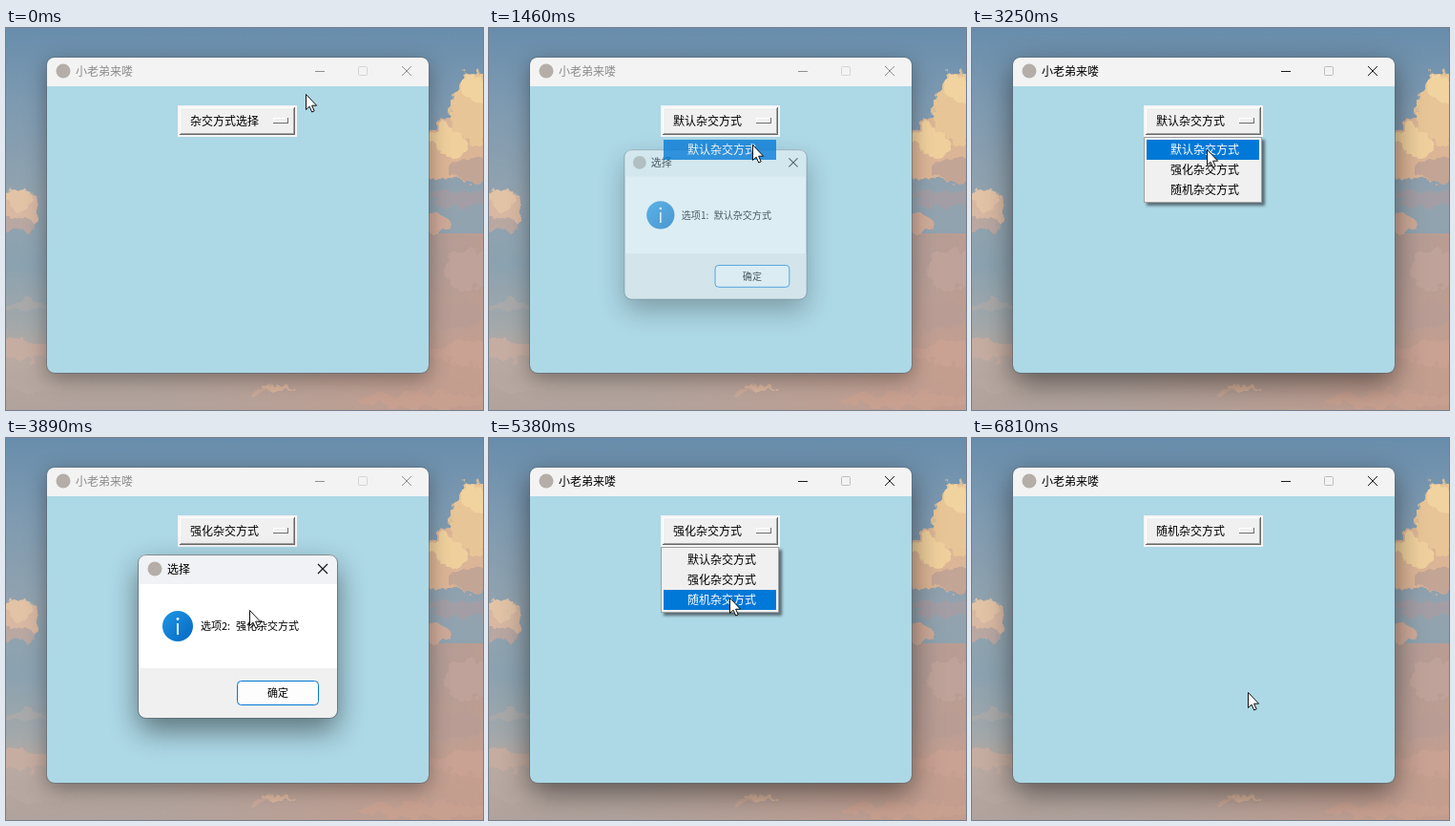
Recreate the animation shown at these times as an HTML page. Size 500 by 400 pixels, loop 6960 ms.

```html
<!DOCTYPE html>
<html lang="zh-CN">
<head>
<meta charset="utf-8">
<title>小老弟来喽</title>
<style>
  html, body { margin: 0; width: 100%; height: 100%; overflow: hidden; }
  svg { display: block; width: 500px; height: 400px; }
  text { font: 12px "Noto Sans CJK SC", "Noto Sans CJK", "Noto Sans", sans-serif; fill: #000; white-space: pre; }
  .small { font-size: 11px; }
  #main .frame { filter: drop-shadow(0 6px 11px rgba(0,0,0,.36)); }
  #main.active .frame { filter: drop-shadow(0 10px 15px rgba(0,0,0,.5)); }
  #main .title { fill: #8c8c8c; }
  #main.active .title { fill: #000; }
  #main .control { stroke: #8f8f8f; }
  #main.active .control { stroke: #1a1a1a; }
  #main .disabled { stroke: #d4d4d4; }
  #main.active .disabled { stroke: #bdbdbd; }
  #dialog .frame { filter: drop-shadow(0 13px 15px rgba(0,0,0,.48)); }
  #ok { fill: #fdfdfd; }
  #ok.hover { fill: #e0eef9; }
  .row rect { fill: none; }
  .row.hot rect { fill: #0078d7; }
  .row.hot text { fill: #fff; }
  #menu .panel { filter: drop-shadow(3px 3px 1.5px rgba(0,0,0,.5)); }
</style>
</head>
<body>
<svg viewBox="0 0 500 400">
  <defs>
    <linearGradient id="sky" x2="0" y2="1">
      <stop offset="0" stop-color="#688dac"/>
      <stop offset=".2" stop-color="#7e9ab1"/>
      <stop offset=".45" stop-color="#93a3ae"/>
      <stop offset=".62" stop-color="#8ba2b0"/>
      <stop offset=".78" stop-color="#a3a8aa"/>
      <stop offset=".86" stop-color="#b9aaa2"/>
      <stop offset="1" stop-color="#b0a29c"/>
    </linearGradient>
    <linearGradient id="warm">
      <stop offset=".3" stop-color="#c99a88" stop-opacity="0"/>
      <stop offset="1" stop-color="#c99a88" stop-opacity=".75"/>
    </linearGradient>
    <linearGradient id="info" x2="1" y2="1">
      <stop offset="0" stop-color="#1e97e4"/>
      <stop offset="1" stop-color="#0667c2"/>
    </linearGradient>
    <filter id="brush" filterUnits="userSpaceOnUse" x="-20" y="-20" width="540" height="440">
      <feTurbulence type="fractalNoise" baseFrequency=".06" numOctaves="3" seed="8"/>
      <feDisplacementMap in="SourceGraphic" scale="22" xChannelSelector="R" yChannelSelector="G"/>
      <feGaussianBlur stdDeviation=".7"/>
    </filter>
    <clipPath id="mainClip"><rect x="43" y="31" width="400" height="330" rx="8"/></clipPath>
    <clipPath id="dialogClip"><rect x="139" y="122" width="208" height="171" rx="8"/></clipPath>
  </defs>

  <rect width="500" height="400" fill="url(#sky)"/>
  <rect y="215" width="500" height="185" fill="url(#warm)"/>
  <g id="clouds" filter="url(#brush)"></g>

  <g id="main">
    <rect class="frame" x="43" y="31" width="400" height="330" rx="8" fill="#add8e6"/>
    <rect x="43" y="31" width="400" height="30" fill="#f3f3f3" clip-path="url(#mainClip)"/>
    <rect x="42.5" y="30.5" width="401" height="331" rx="8" fill="none" stroke="#5b6a75" stroke-opacity=".55"/>
    <circle cx="60" cy="45" r="7.5" fill="#b5aea8"/>
    <text class="title" x="73" y="49.5">小老弟来喽</text>
    <g fill="none">
      <path class="control" d="M324 45.5H334"/>
      <rect class="disabled" x="369.5" y="40.5" width="9" height="9" rx="1"/>
      <path class="control" d="M415 40L425 50M425 40L415 50"/>
    </g>
    <rect x="180" y="81" width="125" height="33" fill="#f4f4f4"/>
    <path d="M182 83H303V112H182Z" fill="#696969"/>
    <path d="M182 83H302V111H182Z" fill="#fff"/>
    <path d="M183 84H302V111H183Z" fill="#a0a0a0"/>
    <path d="M183 84H301V110H183Z" fill="#f0f0f0"/>
    <path d="M280 94H296V100H280Z" fill="#696969"/>
    <path d="M280 94H295V99H280Z" fill="#fff"/>
    <path d="M281 95H294V98H281Z" fill="#f0f0f0"/>
    <text id="choice" x="193" y="102"></text>
  </g>

  <g id="dialog">
    <rect class="frame" x="139" y="122" width="208" height="171" rx="8" fill="#fff"/>
    <g clip-path="url(#dialogClip)">
      <rect x="139" y="122" width="208" height="31" fill="#f0f2f5"/>
      <rect x="139" y="241" width="208" height="52" fill="#f0f0f0"/>
    </g>
    <rect x="138.5" y="122.5" width="209" height="171" rx="8" fill="none" stroke="#56666f" stroke-opacity=".7"/>
    <circle cx="156" cy="137" r="7.5" fill="#b5aea8"/>
    <text x="169" y="141.5">选择</text>
    <path d="M327 132L337 142M337 132L327 142" stroke="#111" stroke-width="1.1"/>
    <circle cx="180" cy="197" r="16" fill="url(#info)"/>
    <path d="M180 194V206" stroke="#fff" stroke-width="1.8"/>
    <circle cx="180" cy="189.5" r="1.4" fill="#fff"/>
    <text id="option" class="small" x="204" y="201.2"></text>
    <text id="message" class="small" x="241" y="201.2"></text>
    <rect id="ok" x="242.5" y="254.5" width="85" height="25" rx="4" stroke="#0078d4"/>
    <text class="small" x="274" y="271.3">确定</text>
  </g>

  <g id="menu">
    <rect class="panel" x="180.5" y="114.5" width="123" height="68" fill="#f0f0f0" stroke="#a0a0a0"/>
  </g>

  <path id="cursor" d="M.5.5V16.5L4.1 13.2L6.7 19L9.2 17.9L6.6 12.2H11.6Z" fill="#fff" stroke="#111" stroke-linejoin="round"/>
</svg>

<script>
const LOOP = 6960;
const NAMES = ['默认杂交方式', '强化杂交方式', '随机杂交方式'];
const ROUNDS = [
  { menu: 610, pick: 1300, ok: 2390 },
  { menu: 2920, pick: 3550, ok: 4360 },
  { menu: 4980, pick: 5630, ok: 6480 }
];
// Screen updates come in bursts: first, last, count.
const BURSTS = [
  [70, 760, 10], [840, 990, 3], [1300, 1990, 10], [2080, 2160, 2],
  [2310, 3000, 10], [3080, 3400, 5], [3550, 4200, 9], [4280, 4900, 9],
  [4980, 5380, 6], [5630, 6260, 9], [6330, 6810, 7]
];
// Pointer stops: time, x, y.
const TRACK = [
  [0, 314, 69], [70, 314, 69], [600, 281, 104], [760, 281, 104], [990, 276, 122],
  [1530, 276, 122], [1990, 292, 255], [2160, 292, 268], [2390, 292, 268],
  [2850, 278, 98], [3080, 276, 98], [3250, 246, 127], [3400, 244, 147],
  [3700, 244, 147], [4200, 284, 264], [4360, 284, 264], [4680, 231, 140],
  [4900, 250, 98], [5050, 250, 98], [5380, 252, 167], [5720, 252, 167],
  [5960, 276, 221], [6260, 289, 266], [LOOP, 289, 266]
];
// Centre, radii and colour of each brush stroke.
const CLOUDS = [
  [8, 192, 30, 17, '#d8b8a2'], [14, 180, 15, 10, '#e2c3a6'], [4, 205, 22, 7, '#b9a7a2'],
  [20, 290, 30, 5, '#a9a9aa'], [12, 338, 45, 10, '#c6ada1'], [30, 372, 60, 7, '#b6a7a0'],
  [480, 128, 46, 34, '#dcb596'], [492, 82, 26, 36, '#e8c596'], [464, 118, 18, 18, '#efd09d'],
  [488, 62, 14, 14, '#f1d3a0'], [490, 150, 28, 12, '#c3a596'], [480, 178, 40, 9, '#a39ea5'],
  [452, 205, 14, 12, '#cfaa99'], [488, 252, 32, 20, '#bfa39a'], [470, 300, 34, 14, '#b99d95'],
  [488, 340, 40, 12, '#c9a294'], [285, 377, 17, 3, '#d8b39c'], [270, 380, 10, 2, '#c9a999'],
  [440, 390, 70, 8, '#c8a090']
];

const $ = id => document.getElementById(id);
const clamp = v => Math.min(1, Math.max(0, v));

function add(parent, tag, attrs, text = '') {
  const node = document.createElementNS(parent.namespaceURI, tag);
  for (const key in attrs) node.setAttribute(key, attrs[key]);
  node.textContent = text;
  return parent.appendChild(node);
}

for (const [cx, cy, rx, ry, fill] of CLOUDS) add($('clouds'), 'ellipse', { cx, cy, rx, ry, fill });

const rows = NAMES.map((name, i) => {
  const row = add($('menu'), 'g', { class: 'row' });
  add(row, 'rect', { x: 183, y: 117 + 21 * i, width: 118, height: 21 });
  add(row, 'text', { x: 208, y: 132 + 21 * i }, name);
  return row;
});
const panel = document.querySelector('.panel');

function lastUpdate(t) {
  let shown = 0;
  for (const [first, last, count] of BURSTS) {
    if (t < first) break;
    const gap = (last - first) / (count - 1);
    shown = first + gap * Math.min(count - 1, Math.floor((t - first) / gap + 1e-6));
  }
  return shown;
}

function pointer(t) {
  const i = Math.max(1, TRACK.findIndex(stop => stop[0] > t));
  const [t0, x0, y0] = TRACK[i - 1], [t1, x1, y1] = TRACK[i];
  const p = clamp((t - t0) / (t1 - t0)), e = p * p * (3 - 2 * p);
  return [x0 + (x1 - x0) * e, y0 + (y1 - y0) * e];
}

function drawMenu(t, round, index, y) {
  const open = t >= round.menu && t < round.pick;
  const ghost = t >= round.pick ? clamp(1 - ((t - round.pick) / 320) ** 2) : 0;
  const hot = open ? Math.floor((y - 117) / 21) : index;
  panel.style.display = open ? '' : 'none';
  rows.forEach((row, i) => {
    row.classList.toggle('hot', i === hot);
    row.style.opacity = open ? 1 : i === index ? ghost : 0;
  });
}

function drawDialog(t, round, index, y) {
  const p = clamp((t - round.pick - 80) / 210);
  const shown = 1 - (1 - p) ** 2;
  const closing = clamp((t - round.ok - 80) / 180);
  const [scale, cx, cy] = closing ? [1 - .1 * closing, 243, 207] : [.8 + .2 * shown, 178, 183];
  $('dialog').style.opacity = shown * (1 - closing);
  $('dialog').setAttribute('transform', `translate(${cx} ${cy}) scale(${scale}) translate(${-cx} ${-cy})`);
  $('option').textContent = `选项${index + 1}:`;
  $('message').textContent = NAMES[index];
  $('ok').classList.toggle('hover', y > 256);
}

function draw(time) {
  const t = lastUpdate(time);
  const [x, y] = pointer(t);
  const next = ROUNDS.findIndex(r => t < r.ok + 260);
  const index = next < 0 ? ROUNDS.length - 1 : next;
  const round = ROUNDS[index];
  const picked = t >= round.pick + 70;
  const modal = picked && t < round.ok + 80;

  $('main').classList.toggle('active', t >= 520 && !modal);
  $('choice').textContent = picked ? NAMES[index] : NAMES[index - 1] || '杂交方式选择';
  drawMenu(t, round, index, y);
  drawDialog(t, round, index, y);
  $('cursor').setAttribute('transform', `translate(${Math.round(x)} ${Math.round(y)})`);
}

const start = performance.now();
function tick() {
  draw((performance.now() - start) % LOOP);
  requestAnimationFrame(tick);
}
tick();
</script>
</body>
</html>
```
